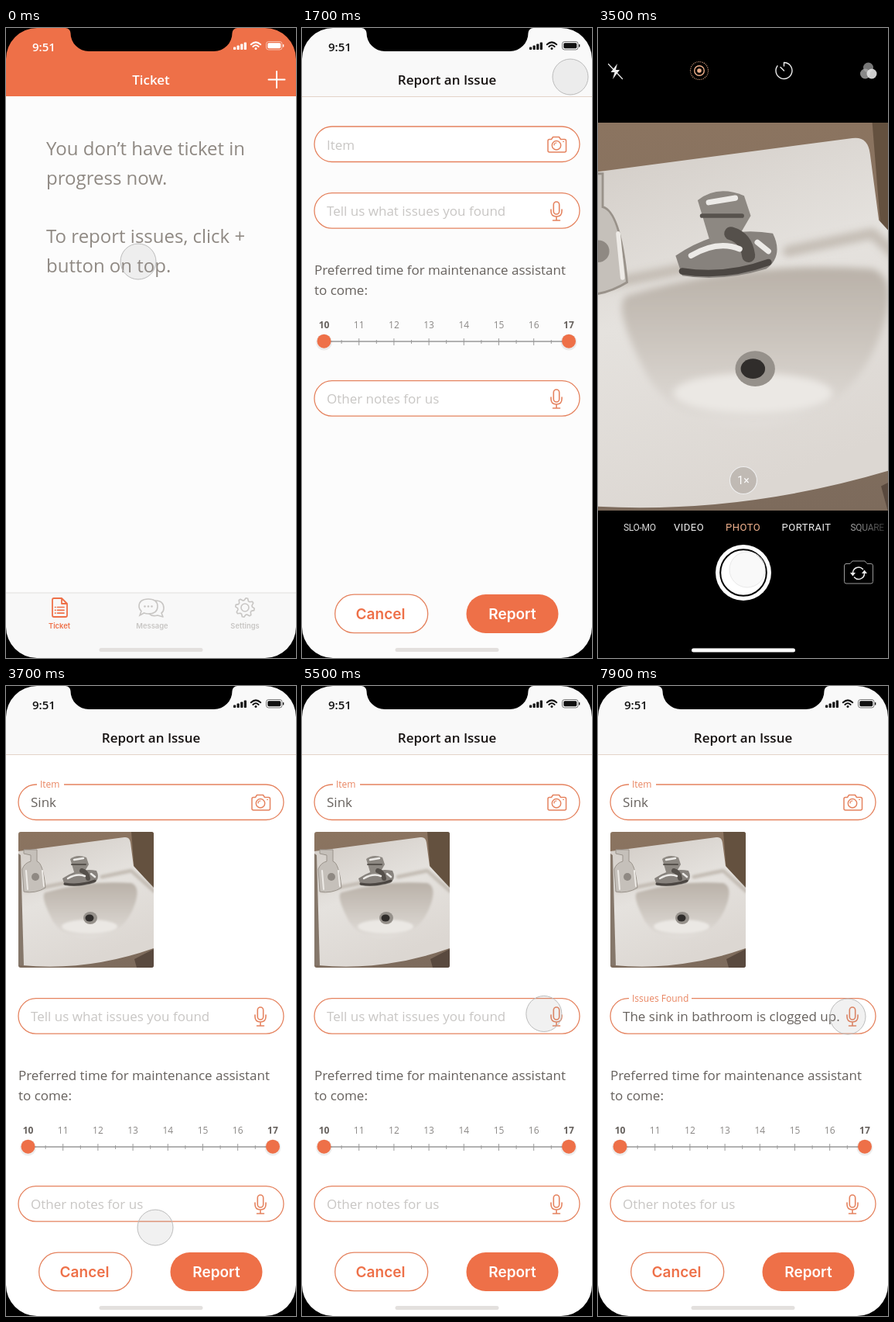
Animation of 375x812 px, one loop 8 s. Source, as an HTML page:

```html
<!DOCTYPE html>
<html lang="en">
<head>
<meta charset="utf-8">
<title>Report an issue</title>
<style>
html, body { margin: 0; width: 100%; height: 100%; overflow: hidden; background: #fff; }
svg { display: block; width: 375px; height: 812px; font-family: "Open Sans", sans-serif; }
.ui { font-family: Inter, "Liberation Sans", sans-serif; }
.cam { font-family: Roboto, "Liberation Sans", sans-serif; }
.line { fill: none; stroke-linecap: round; stroke-linejoin: round; }
</style>
</head>
<body>
<svg id="stage" viewBox="0 0 375 812"></svg>
<script>
const LOOP = 8000;
const ORANGE = '#ee7048', EDGE = '#e5835f', GREY = '#c8c6c4', INK = '#66615d';
const stage = document.getElementById('stage');
const range = (n, fn) => Array.from({ length: n }, (_, i) => fn(i)).join('');

const text = (x, y, size, fill, s, extra = '') =>
  `<text x="${x}" y="${y}" font-size="${size}" fill="${fill}" ${extra}>${s}</text>`;
const rect = (x, y, w, h, fill, extra = '') =>
  `<rect x="${x}" y="${y}" width="${w}" height="${h}" fill="${fill}" ${extra}/>`;
const circle = (x, y, r, fill, extra = '') =>
  `<circle cx="${x}" cy="${y}" r="${r}" fill="${fill}" ${extra}/>`;
const ellipse = (x, y, rx, ry, fill, extra = '') =>
  `<ellipse cx="${x}" cy="${y}" rx="${rx}" ry="${ry}" fill="${fill}" ${extra}/>`;
const line = (d, stroke, width = 1.4, extra = '') =>
  `<path class="line" d="${d}" stroke="${stroke}" stroke-width="${width}" ${extra}/>`;
const shape = (d, fill, extra = '') => `<path d="${d}" fill="${fill}" ${extra}/>`;
const group = (id, body, extra = '') => `<g id="${id}" ${extra}>${body}</g>`;
const gradient = (id, dir, ...colors) => `<linearGradient id="${id}" ${dir}>` +
  colors.map((c, i) => `<stop offset="${i / (colors.length - 1)}" stop-color="${c}"/>`).join('') +
  '</linearGradient>';
const blur = (id, r) => `<filter id="${id}" x="-50%" y="-50%" width="200%" height="200%"><feGaussianBlur stdDeviation="${r}"/></filter>`;
const MIDDLE = 'text-anchor="middle"';

const statusBar = c =>
  text(34, 30, 15, c, '9:51', 'font-weight="600"') +
  range(4, i => rect(294 + i * 4.6, 24.5 - i * 2, 3.2, 3.5 + i * 2, c, 'rx=".8"')) +
  line('M316.8 21.3Q323 15.5 329.2 21.3M319.4 24Q323 20.6 326.6 24', c, 2) +
  circle(323, 26.6, 1.5, c) +
  `<rect x="336.5" y="17.5" width="20.5" height="10.5" rx="3" fill="none" stroke="${c}" opacity=".55"/>` +
  rect(338.3, 19.2, 17, 7, c, 'rx="1.6"') + rect(358, 21, 1.3, 3.6, c, 'rx=".6"');

const homeBar = c => rect(120.5, 799, 134, 5, c, 'rx="2.5"');

function ticketScreen() {
  const gear = 'M' + range(32, i => {
    const r = i % 4 < 2 ? 12.3 : 9.4, a = (i + .5) * Math.PI / 16;
    return `${i ? 'L' : ''}${(309 + r * Math.sin(a)).toFixed(1)} ${(747 - r * Math.cos(a)).toFixed(1)}`;
  }) + 'Z';
  const label = (x, c, s) => text(x, 774, 9.4, c, s, `class="ui" font-weight="600" ${MIDDLE}`);
  const copy = ['You don’t have ticket in', 'progress now.', '', 'To report issues, click +', 'button on top.'];
  return rect(0, 0, 375, 812, '#fcfcfc') + rect(0, 0, 375, 88, ORANGE) + statusBar('#fff') +
    text(187.5, 73, 17, '#fff', 'Ticket', `font-weight="600" ${MIDDLE}`) +
    line('M339.5 66.5H360.5M350 56V77', '#fff', 2) +
    copy.map((s, i) => text(52, 164 + i * 37.8, 24, '#8f8983', s)).join('') +
    rect(0, 728, 375, 84, '#f8f8f8') + rect(0, 727.5, 375, 1, '#e1dfde') +
    line('M60 737Q60 735 62 735H72L79 742V757Q79 759 77 759H62Q60 759 60 757ZM72 735V742H79', ORANGE, 1.8) +
    range(3, i => line(`M63.5 ${746.5 + i * 3.8}h.5M66.5 ${746.5 + i * 3.8}H75`, ORANGE, 1.7)) +
    line('M193 738Q204 738 204 748Q204 752 201 754L203 759L196 757Q189 759 185 755', GREY, 1.6) +
    shape('M184 736Q196 736 196 745.5T184 755Q181 755 178.5 754L173 757L175 751.5Q172 749 172 745.5Q172 736 184 736Z',
      '#f8f8f8', `stroke="${GREY}" stroke-width="1.6"`) +
    range(3, i => circle(179.5 + i * 4.5, 745.5, 1.3, GREY)) +
    line(gear, GREY, 1.6) + circle(309, 747, 5, 'none', `stroke="${GREY}" stroke-width="1.6"`) +
    label(69, ORANGE, 'Ticket') + label(189, GREY, 'Message') + label(309, GREY, 'Settings') +
    homeBar('#e3e0de');
}

const pill = (y, fill = '#fff') =>
  rect(16, y, 343, 45.5, fill, `rx="22.75" stroke="${EDGE}" stroke-width="1.3"`);
const mic = (y, id) => group(id,
  `<rect x="325.3" y="${y - 12}" width="7.4" height="16" rx="3.7"/>` +
  `<path d="M322 ${y - 2}V${y}Q322 ${y + 7} 329 ${y + 7}T336 ${y}V${y - 2}M329 ${y + 7}V${y + 12}M324.5 ${y + 12}H333.5"/>`,
  `class="line" stroke="${EDGE}" stroke-width="1.6"`);
const floating = (y, w, s) => rect(40, y - 3, w, 6, '#fff') + text(44, y + 4, 12, '#e98460', s);

function formScreen() {
  const hour = i => 28.5 + i * 45.2;
  const bars = range(90, i => {
    const swell = Math.min(1, .12 + (i / 13) ** 2);
    const h = 1.5 + 15 * swell * (.6 + .25 * Math.cos(i * 2.6) + .15 * Math.sin(i * .9 - 1));
    return rect(18 + i * 2.9, 235.5 - h / 2, 1.6, h, '#fff');
  });
  return rect(0, 0, 375, 812, '#fff', 'id="formBack"') + rect(0, 0, 375, 88, '#f9f9f9') +
    rect(0, 88, 375, 1, '#e3d3c9') + statusBar('#111') +
    text(187.5, 73, 17, '#151110', 'Report an Issue', `font-weight="600" ${MIDDLE}`) +
    pill(127) +
    line('M318 145.5Q318 143.5 320 143.5H322.5L324.5 140.5H332.5L334.5 143.5H339.5Q341.5 143.5 341.5 145.5V158Q341.5 160 339.5 160H320Q318 160 318 158Z', EDGE, 1.5) +
    circle(329, 151.2, 5.7, 'none', `stroke="${EDGE}" stroke-width="1.5"`) +
    line('M326 151Q326 148 329 148M337.5 146.5H338.5', EDGE, 1.2) +
    group('itemEmpty', text(32, 157, 17, GREY, 'Item')) +
    group('itemFilled', floating(127, 35, 'Item') + text(32, 156, 17, INK, 'Sink') +
      `<g transform="translate(16 188)" clip-path="url(#thumb)">${sinkPhoto()}</g>`) +
    group('lower',
      pill(212.7) +
      group('tellEmpty', text(32, 242, 17, GREY, 'Tell us what issues you found')) +
      group('recording', `<g clip-path="url(#pillClip)"><g clip-path="url(#progressClip)">` +
        rect(16, 212, 343, 47, '#f7915e') + bars + '</g></g>' +
        `<rect x="16" y="212.7" width="343" height="45.5" rx="22.75" fill="none" stroke="${EDGE}" stroke-width="1.3"/>`) +
      group('tellFilled', floating(213, 81, 'Issues Found') +
        text(32, 242, 17, INK, 'The sink in bathroom is clogged up.')) +
      mic(236, 'tellMic') +
      text(16, 318, 17, INK, 'Preferred time for maintenance assistant') + text(16, 344, 17, INK, 'to come:') +
      line('M28 404H345', '#999', 1.3) +
      range(8, i => text(hour(i), 387, 12, i % 7 ? '#8a8785' : '#66615d', 10 + i,
        `${MIDDLE} font-weight="${i % 7 ? 400 : 700}"`) +
        line(`M${hour(i)} 400.5V408.5`, '#999', 1) +
        (i < 7 ? line(`M${hour(i) + 22.6} 402.5V406.5`, '#999', 1) : '')) +
      [28.5, 345].map(x => circle(x, 405, 10.5, '#000', 'opacity=".07"') + circle(x, 403.7, 9, ORANGE)).join('') +
      pill(454.7) + text(32, 484, 17, GREY, 'Other notes for us') + mic(478, 'notesMic')) +
    rect(42.7, 730.2, 120, 49.5, '#fff', `rx="24.7" stroke="${EDGE}" stroke-width="1.3"`) +
    rect(212.5, 730, 119, 50, ORANGE, 'rx="25"') +
    text(101.5, 762, 19, ORANGE, 'Cancel', `class="ui" font-weight="600" ${MIDDLE}`) +
    text(272, 762, 19, '#fff', 'Report', `class="ui" font-weight="600" ${MIDDLE}`) +
    homeBar('#e3e0de');
}

// Drawn in a 175 x 175 box.
function sinkPhoto() {
  return rect(0, 0, 175, 175, 'url(#brown)') + shape('M146 0H175V90L150 50Z', '#64513f') +
    shape('M0 25L137 7Q144 6 145 14L149 44L175 72V150Q90 180 5 172L0 100Z', 'url(#ceramic)') +
    line('M10 76L60 66M108 58L146 50L175 76', '#bdb5ac', 5, 'filter="url(#haze)" opacity=".8"') +
    shape('M35 78Q88 62 146 66Q158 70 151 92Q138 132 98 137Q56 140 42 110Q28 82 35 78Z', 'url(#bowl)', 'filter="url(#haze)"') +
    ellipse(92, 122, 36, 9, '#ebe8e4', 'filter="url(#haze)"') +
    shape('M0 28L3 30L7 172L0 172Z', '#85776a') + shape('M150 164L175 151V175H153Z', '#59493e') +
    shape('M5 48Q8 40 16 38V30L7 28V23H24V38Q32 40 35 72Q22 80 7 77Z', '#c5c0ba', 'stroke="#99928a"') +
    circle(22, 58, 5, '#8f8983') + line('M10 50L12 74M31 50L33 70', '#eeebe7', 2) +
    shape('M57 60Q78 46 101 50Q106 60 98 66Q78 72 60 69Z', '#87827d') +
    line('M60 67Q80 70 99 63', '#4b4642', 3) +
    shape('M67 35Q76 28 88 33L91 42L84 54L73 55Z', '#8d8882') + line('M82 50Q89 52 90 60', '#55504b', 6) +
    line('M64 60Q76 53 86 57M72 36L84 34M94 54L99 58', '#eceae7', 2.5) + line('M69 42L87 42', '#57524d', 2) +
    ellipse(93, 111, 9, 8, '#96918b') + ellipse(92, 111, 5.5, 4.5, '#302d2b');
}

function showerPhoto() {
  const fold = (x, color, w) => line(`M${x} 205L${x - (x - 190) * .09} 640`, color, w, 'filter="url(#soft)" opacity=".5"');
  return rect(0, 122, 375, 500, 'url(#wall)') + shape('M0 122H22L98 172V284L0 266Z', 'url(#corner)') +
    ellipse(125, 262, 25, 14, '#7f715f', 'filter="url(#soft)" opacity=".5"') +
    shape('M0 266L105 285V622H0Z', 'url(#leftWall)') + shape('M105 285L265 283V622H107Z', 'url(#surround)') +
    line('M0 266L105 285L265 283', '#d9cfc2', 2) +
    ellipse(199, 300, 20, 13, '#fff', 'filter="url(#soft)"') +
    line('M107 290V622M244 284L241 622', '#a99d90', 2) +
    shape('M180 525L236 535V622H180Z', '#beb3a6') + line('M184 524L240 533V622', '#ddd5ca', 3) +
    line('M182 529L236 539V622', '#a2978a', 1.5) + rect(236, 537, 5, 16, '#776e65') +
    `<g clip-path="url(#curtainClip)">` + rect(250, 160, 125, 462, 'url(#curtain)') +
    fold(275, '#a39b92', 10) + fold(322, '#a0988f', 12) + fold(300, '#ddd8d1', 12) + fold(365, '#9f978e', 12) +
    shape('M258 180L375 165V190L263 202Z', '#d5cfc7') + '</g>' +
    line('M0 201Q140 148 375 143', '#57504a', 17) + line('M0 197Q140 144 375 139', '#cfc9c1', 4) +
    line('M0 206Q140 153 375 148', '#8f877e', 3) +
    line('M276 142Q270 160 278 179M357 137Q362 155 356 178', '#c9c4bd', 2) +
    circle(40, 222, 8.5, '#55504c') + line('M42 222Q62 220 72 236', '#6f6963', 6) + line('M46 219Q62 218 70 230', '#c5c0b9', 1.5) +
    shape('M69 238L81 231L92 255Q88 264 74 261Z', '#56514d') + line('M73 259Q84 262 90 254M76 240L82 251', '#bcb6ae', 2.5) +
    ellipse(57, 583, 15, 27, '#655f59', 'transform="rotate(8 57 583)"') +
    ellipse(55, 584, 10, 21, '#8f8880', 'transform="rotate(8 55 584)"') +
    circle(60, 588, 9, '#3b3632') + line('M62 586L70 591L72 604', '#c5bfb7', 6);
}

function cameraScreen() {
  const mode = (x, size, fill, s, gap = .5) =>
    text(x, 648, size, fill, s, `class="cam" letter-spacing="${gap}"`);
  const W = '#eee', PEACH = '#efb08c';
  return rect(0, 0, 375, 812, '#000') +
    line('M13.5 46.5L31.5 65.5', W, 1.2) + shape('M25 46L16.5 57H21.5L19 66L28 54H23Z', W) +
    circle(131, 55, 2.8, PEACH) + circle(131, 55, 6.3, 'none', `stroke="${PEACH}" stroke-width="1.4"`) +
    circle(131, 55, 11.5, 'none', `stroke="${PEACH}" stroke-width="1.2" stroke-dasharray="1 1.4"`) +
    line('M240.5 49V44.5A10.5 10.5 0 1 1 232 48.8M236 50.5L240.5 55', W, 1.4) +
    circle(349.5, 51, 6.5, '#777') + circle(345.5, 59, 6.5, '#aaa', 'opacity=".8"') + circle(354, 59, 6.5, '#e3e3e3', 'opacity=".9"') +
    `<g clip-path="url(#finder)">` +
    group('sinkView', `<g transform="translate(-62.5 122) scale(2.857)">${sinkPhoto()}</g>`) +
    group('showerView', `<g clip-path="url(#finder)">${showerPhoto()}</g>`) + '</g>' +
    circle(188, 583, 17.5, '#8a8178', 'fill-opacity=".35" stroke="#eee" stroke-width="1.2"') +
    text(188, 588, 14, '#fff', '1×', `class="cam" ${MIDDLE}`) +
    mode(33, 12, '#ddd', 'SLO-MO', -.3) + mode(98, 13, W, 'VIDEO') + mode(165, 13, PEACH, 'PHOTO') +
    mode(237.5, 13, W, 'PORTRAIT') + mode(326.5, 12, 'url(#fade)', 'SQUARE', -.3) +
    circle(188, 702, 36, '#fff') + circle(188, 702, 29.8, '#fff', 'stroke="#000" stroke-width="2"') +
    line('M321 690.5H326L329 687H345L348 690.5H353Q355.5 690.5 355.5 693V713.5Q355.5 716 353 716H321Q318.5 716 318.5 713.5V693Q318.5 690.5 321 690.5Z', '#999', 1) +
    line('M329.5 702A7.5 7.5 0 0 1 342.5 697.5M344.5 703A7.5 7.5 0 0 1 331.5 708', W, 1.5) +
    shape('M326 702H333L329.5 706.5ZM341 703H348L344.5 698.5Z', W) +
    rect(121, 799.5, 134, 5, '#fff', 'rx="2.5"');
}

const down = 'x1="0" y1="0" x2="0" y2="1"';
stage.innerHTML = '<defs>' +
  gradient('wall', down, '#a69786', '#9c8c79', '#a59581') + gradient('leftWall', '', '#a09180', '#b0a291') +
  gradient('corner', '', '#a09484', '#8c8479', '#77746f') + gradient('brown', down, '#8b7460', '#7d6b5c') +
  gradient('surround', down, '#beb3a6', '#cbc2b7', '#c2b8ab') + gradient('curtain', '', '#c9c3bb', '#c2bcb4', '#c6c0b8', '#b8b2aa') +
  gradient('ceramic', 'x1="0" y1="0" x2=".4" y2="1"', '#d0cac4', '#e5e2de', '#dcd7d2') +
  gradient('bowl', down, '#b9b1a8', '#cdc7c0', '#e2deda') + gradient('fade', '', '#aaa', '#333') +
  blur('soft', 5) + blur('haze', 1.6) +
  `<clipPath id="thumb">${rect(0, 0, 175, 175, '#000', 'rx="3"')}</clipPath>` +
  `<clipPath id="finder">${rect(0, 122, 375, 500, '#000')}</clipPath>` +
  `<clipPath id="curtainClip">${shape('M258 180Q310 187 375 165V622H251L263 205Z', '#000')}</clipPath>` +
  `<clipPath id="pillClip">${rect(16, 212.7, 343, 45.5, '#000', 'rx="22.75"')}</clipPath>` +
  `<clipPath id="progressClip">${rect(16, 212, 0, 47, '#000', 'id="progress"')}</clipPath></defs>` +
  group('ticket', ticketScreen()) + group('form', formScreen()) +
  shape('M0 0H375V812H0ZM40 0A40 40 0 0 0 0 40V772A40 40 0 0 0 40 812H335A40 40 0 0 0 375 772V40A40 40 0 0 0 335 0Z', '#000', 'fill-rule="evenodd"') +
  shape('M77 0A6.5 6.5 0 0 1 83.5 6.5A23.5 23.5 0 0 0 107 30H269A23.5 23.5 0 0 0 292.5 6.5A6.5 6.5 0 0 1 299 0Z', '#000') +
  group('camera', cameraScreen()) + circle(0, 0, 23, '#888', 'id="touch"');

const el = Object.fromEntries([...stage.querySelectorAll('[id]')].map(n => [n.id, n]));
const ramp = (t, a, b) => Math.min(1, Math.max(0, (t - a) / (b - a)));
const ease = p => p * p * (3 - 2 * p);
const mix = (a, b, p) => a + (b - a) * p;
const show = (node, on) => node.setAttribute('visibility', on ? 'inherit' : 'hidden');

const SHOT = 3650, REC = 6000, RELEASE = 7300;
// time, x, y
const path = [
  [150, 171, 301], [900, 347, 63], [1800, 347, 63], [2300, 327, 153], [2800, 327, 153],
  [3400, 193, 698], [4000, 193, 698], [4700, 136, 361], [4900, 136, 361], [5600, 323, 426]
];
const taps = [[1000, 1200], [2350, 2500], [3500, 3650], [5750, RELEASE + 100]];

function touchAt(t) {
  let i = 0;
  while (i < path.length - 2 && t > path[i + 1][0]) i++;
  const [a, b] = [path[i], path[i + 1]];
  const p = ease(ramp(t, a[0], b[0]));
  return [mix(a[1], b[1], p), mix(a[2], b[2], p)];
}

function draw(t) {
  const inCamera = t >= 2400 && t < SHOT;
  const filled = t >= SHOT;
  const recording = t >= REC && t < RELEASE;
  const told = t >= RELEASE + 100;

  show(el.form, t >= 1150);
  el.form.setAttribute('opacity', ease(ramp(t, 1150, 1550)));
  el.formBack.setAttribute('fill', filled ? '#fff' : '#fcfcfc');
  show(el.itemEmpty, !filled);
  show(el.itemFilled, filled);
  el.lower.setAttribute('transform', `translate(0 ${filled ? 190 : 0})`);
  show(el.tellEmpty, t < REC);
  show(el.recording, recording);
  show(el.tellFilled, told);
  el.progress.setAttribute('width', Math.max(0, t - REC) * .1675);
  el.tellMic.setAttribute('stroke', recording ? '#c9c7c5' : EDGE);

  show(el.camera, inCamera);
  el.camera.setAttribute('opacity', ramp(t, 2400, 2600));
  const pan = 375 * ease(ramp(t, 2800, 3350));
  el.showerView.setAttribute('transform', `translate(${-pan} 0)`);
  el.sinkView.setAttribute('transform', `translate(${375 - pan} 0)`);

  const press = Math.max(...taps.map(([a, b]) => ramp(t, a, a + 70) * (1 - ramp(t, b - 70, b))));
  const [x, y] = touchAt(t);
  el.touch.setAttribute('cx', x);
  el.touch.setAttribute('cy', y);
  el.touch.setAttribute('r', 23 - press * 1.3);
  el.touch.setAttribute('fill', inCamera ? '#ccc' : '#888');
  el.touch.setAttribute('fill-opacity', .12 + press * .07);
  el.touch.setAttribute('stroke', inCamera ? '#e8e8e8' : '#bbb');
}

function tick(now) {
  draw(now % LOOP);
  requestAnimationFrame(tick);
}
draw(0);
requestAnimationFrame(tick);
</script>
</body>
</html>
```
